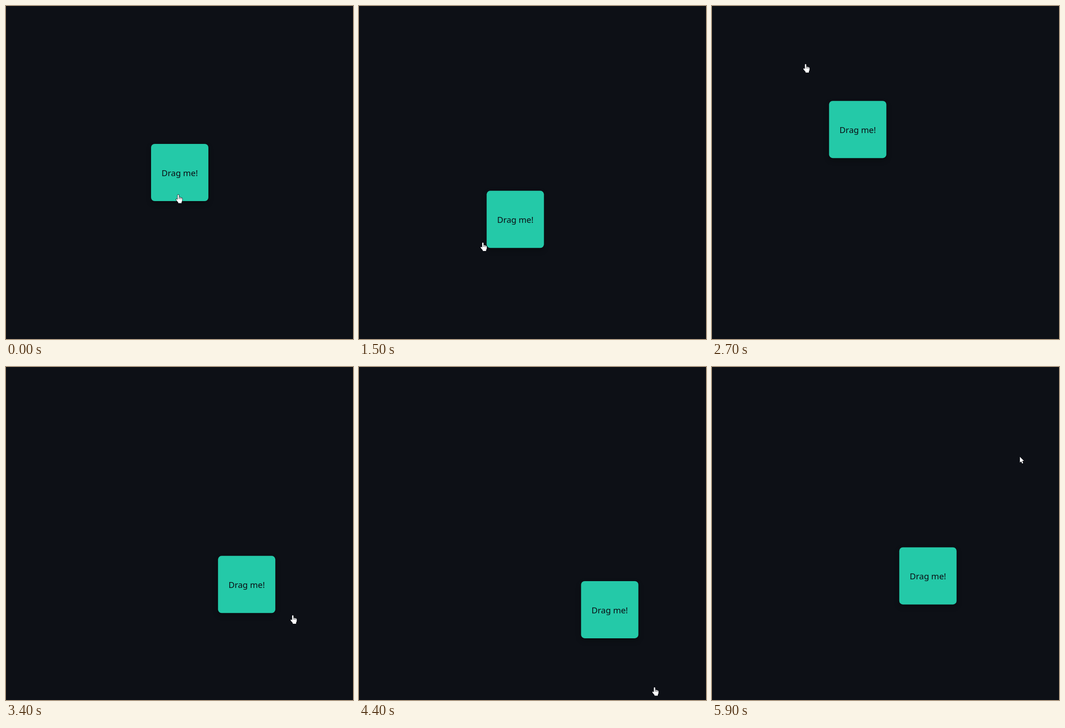
An HTML page with a canvas that plays this animation: 763 by 734 pixels, repeating every 6 s.

```html
<!DOCTYPE html>
<html lang="en">
<head>
<meta charset="utf-8">
<title>Drag me</title>
<style>
  html, body { margin: 0; height: 100%; overflow: hidden; background: #0d1016; }
  canvas { display: block; }
</style>
</head>
<body>
<canvas id="stage" width="763" height="734"></canvas>
<script>
const ctx = document.getElementById('stage').getContext('2d');
const STEP = 100, STEPS = 60;
const GRAB = 8, REGRAB = 36, RELEASE = 51.8;   // in steps
const ELASTIC = 0.35, SETTLE = 0.7, SIZE = 126;

// Per axis: home of the box, free drag range, pointer positions that keep the
// box at home in the two drags, and the turning points [step, position] of the
// pointer, which swings between them like a circling hand.
const axisX = {
  home: 319, limit: 92.5, hold: [382, 338],
  turns: [[0, 379], [2, 328], [5.5, 434], [8, 382], [11.5, 414], [17, 214],
    [22.8, 325], [25, 172], [37.8, 747], [41, 575], [45.5, 675], [48.5, 462],
    [RELEASE, 552], [52, 485], [56, 510], [59, 677]]
};
const axisY = {
  home: 304, limit: 93, hold: [399, 399],
  turns: [[0, 416], [3.5, 305], [6.5, 400], [9, 388], [14.3, 530], [20.9, 220],
    [23.5, 325], [28, 102], [37.2, 712], [40, 500], [44, 706], [47.5, 545],
    [RELEASE, 680], [52, 597], [56, 608], [59, 198]]
};

const hand = new Path2D(`M-1.6 1.4Q-1.6 0 -.2 0Q1.3 0 1.3 1.5V6
  Q2.4 5 3.7 6.4Q5 5.6 6.1 7Q8.4 6.6 8.5 9V12.5Q8.3 14.6 7 16.2V18.6H-.2V17
  L-4.6 11.8Q-5.7 10 -4.2 9.5Q-3 9.2 -1.6 11Z`);
const fingers = new Path2D('M1.3 6V9.5M3.7 6.8V9.7M6.1 7.4V10');
const arrow = new Path2D('M0 0V12.6L2.9 9.9L5 14.8L7.2 13.8L5.1 9.1H9Z');

function pointerAt({ turns }, step) {
  const next = turns.findIndex(([at]) => at >= step) || 1;
  const [t0, from] = turns[next - 1], [t1, to] = turns[next];
  const swing = (1 - Math.cos(Math.PI * (step - t0) / (t1 - t0))) / 2;
  return from + (to - from) * swing;
}

// Follows the pointer inside the range, lags like a rubber band outside it,
// and relaxes to the edge of the range once let go.
function boxAt(axis, step) {
  const { home, limit, hold } = axis;
  if (step < GRAB) return home;
  if (step > RELEASE) {
    const edge = home + limit;
    return edge + (boxAt(axis, RELEASE) - edge) * Math.exp(SETTLE * (RELEASE - step));
  }
  const pull = pointerAt(axis, step) - hold[step < REGRAB ? 0 : 1];
  const inside = Math.min(Math.max(pull, 0), limit);
  return home + inside + (pull - inside) * ELASTIC;
}

function drawBox(x, y) {
  ctx.save();
  ctx.shadowColor = 'rgba(0, 0, 0, 0.3)';
  ctx.shadowBlur = 12;
  ctx.shadowOffsetY = 5;
  ctx.fillStyle = '#24c9a8';
  ctx.beginPath();
  ctx.roundRect(x, y, SIZE, SIZE, 8);
  ctx.fill();
  ctx.restore();
  ctx.fillStyle = '#0b0e14';
  ctx.font = '18.5px "Noto Sans", sans-serif';
  ctx.textAlign = 'center';
  ctx.fillText('Drag me!', x + SIZE / 2, y + 71);
}

function drawPointer(x, y, released) {
  const shape = released ? arrow : hand;
  ctx.save();
  ctx.translate(x, y);
  ctx.lineJoin = 'round';
  ctx.strokeStyle = '#0b0e14';
  ctx.lineWidth = 1.6;
  ctx.stroke(shape);
  ctx.fillStyle = '#fff';
  ctx.fill(shape);
  if (!released) {
    ctx.lineWidth = 0.8;
    ctx.stroke(fingers);
  }
  ctx.restore();
}

function frame() {
  const step = Math.floor(performance.now() / STEP) % STEPS;
  ctx.fillStyle = '#0d1016';
  ctx.fillRect(0, 0, 763, 734);
  drawBox(boxAt(axisX, step), boxAt(axisY, step));
  drawPointer(pointerAt(axisX, step), pointerAt(axisY, step), step > RELEASE);
  requestAnimationFrame(frame);
}
frame();
</script>
</body>
</html>
```
